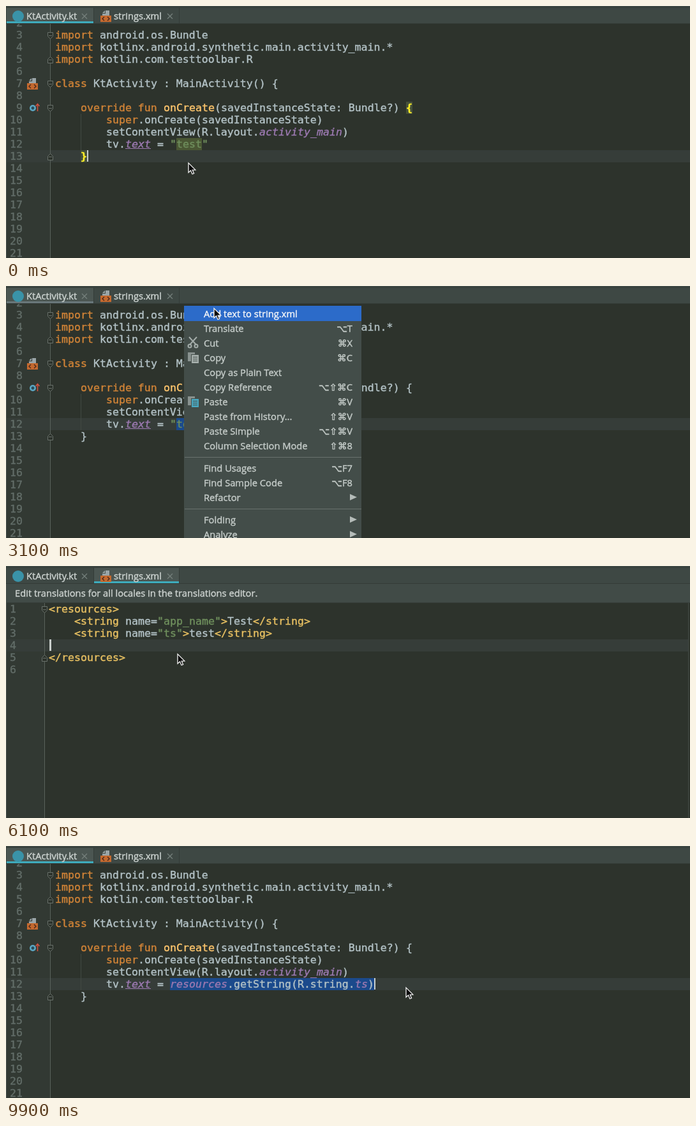
An HTML page with a canvas for the animation above (10000 ms loop, 1072x395 px).

```html
<!DOCTYPE html>
<html>
<head>
<meta charset="utf-8">
<style>
html, body { margin: 0; width: 100%; height: 100%; overflow: hidden; background: #2d332c; }
canvas { display: block; }
</style>
</head>
<body>
<canvas id="stage" width="1072" height="395"></canvas>
<script>
const ctx = document.getElementById('stage').getContext('2d');
const MONO = '16.6px "DejaVu Sans Mono", monospace';
const UI = '14.7px "Open Sans", "DejaVu Sans", sans-serif';
const CW = 10, LH = 19;
const INK = { t: '#b3c2c6', o: '#d08337', f: '#ffc66d', p: '#9b79b0', u: '#9b79b0', s: '#6f8f5d', x: '#e8c062', b: '#ffef28' };

const rect = (c, x, y, w, h) => { ctx.fillStyle = c; ctx.fillRect(x, y, w, h); };
const frame = (c, x, y, w, h, lw = 1) => {
  ctx.strokeStyle = c; ctx.lineWidth = lw;
  ctx.strokeRect(x + lw / 2, y + lw / 2, w - lw, h - lw);
};
const dot = (c, x, y, r) => { ctx.fillStyle = c; ctx.beginPath(); ctx.arc(x, y, r, 0, 7); ctx.fill(); };
function path(pts, fill, stroke, lw = 1, open) {
  ctx.beginPath();
  pts.forEach(([x, y]) => ctx.lineTo(x, y));
  if (!open) ctx.closePath();
  if (fill) { ctx.fillStyle = fill; ctx.fill(); }
  if (stroke) { ctx.strokeStyle = stroke; ctx.lineWidth = lw; ctx.stroke(); }
}
// a hairline outline gives the slightly heavy screen smoothing
function ink(font, c, s, x, y) {
  ctx.font = font; ctx.fillStyle = ctx.strokeStyle = c; ctx.lineWidth = .4;
  ctx.fillText(s, x, y);
  ctx.strokeText(s, x, y);
}
function label(s, x, y, c = '#c6cdca', align = 'left') {
  ctx.textAlign = align;
  ink(UI, c, s, x, y);
  ctx.textAlign = 'left';
}
// parts alternate between an ink key and text
function code(parts, x, y) {
  for (let i = 0; i < parts.length; i += 2) {
    const k = parts[i], s = parts[i + 1], w = s.length * CW;
    const style = k === 'p' || k === 'u' ? 'italic ' : k === 'b' ? 'bold ' : '';
    ink(style + MONO, INK[k], s, x, y);
    if (k === 'u') rect(INK.u, x, y + 1, w, 1);
    x += w;
  }
}
const lineNo = (n, x, y) => ink(MONO, '#626d68', n, x, y);
function fold(x, y, dir) {
  const p = [[-4, -5], [4, -5], [4, 1], [0, 5], [-4, 1]];
  path(p.map(([a, b]) => [x + a + .5, y + b * dir + .5]), '#2d332c', '#69716b');
  rect('#69716b', x - 2, y, 5, 1);
}

function xmlIcon(x, y) {
  path([[x + 8, y], [x + 14, y], [x + 14, y + 8], [x + 3, y + 8], [x + 3, y + 5], [x + 8, y + 5]], '#9aa5a8');
  path([[x + 3, y + 4], [x + 7, y], [x + 7, y + 4]], '#9aa5a8');
  rect('#c4692f', x, y + 8, 17, 10);
  path([[x + 6, y + 10], [x + 3, y + 13], [x + 6, y + 16]], null, '#46261a', 1.3, true);
  path([[x + 11, y + 10], [x + 14, y + 13], [x + 11, y + 16]], null, '#46261a', 1.3, true);
}
function cross(x, y) {
  path([[x - 4, y - 4], [x + 4, y + 4]], null, '#75807c', 1.2, true);
  path([[x + 4, y - 4], [x - 4, y + 4]], null, '#75807c', 1.2, true);
}
function tabs(xml, focused) {
  rect('#3e4844', 0, 0, 1072, 28);
  rect('#333b37', 0, 2, 1072, 1);
  rect('#343b37', 0, 27, 1072, 1);
  const x = xml ? 138 : 1, w = xml ? 133 : 136;
  rect('#4b5652', x, 3, w, 24);
  rect('#343c38', 137, 3, 1, 24);
  rect('#343c38', 271, 3, 1, 24);
  rect(focused ? '#3eabbc' : '#69777a', x, 24, w, 3);
  dot('#3a93a8', 19, 16, 9);
  label('KtActivity.kt', 32, 21, '#ced5d2'); cross(123, 16);
  xmlIcon(148, 7);
  label('strings.xml', 169, 21, '#ced5d2'); cross(257, 16);
}

const ktLines = {
  3: ['o', 'import ', 't', 'android.os.Bundle'],
  4: ['o', 'import ', 't', 'kotlinx.android.synthetic.main.activity_main.*'],
  5: ['o', 'import ', 't', 'kotlin.com.testtoolbar.R'],
  7: ['o', 'class ', 't', 'KtActivity : MainActivity() {'],
  9: ['o', '    override fun ', 'f', 'onCreate', 't', '(savedInstanceState: Bundle?) '],
  10: ['o', '        super', 't', '.onCreate(savedInstanceState)'],
  11: ['t', '        setContentView(R.layout.', 'p', 'activity_main', 't', ')']
};
const setText = ['t', '        tv.', 'u', 'text', 't', ' = '];
const col = c => 77 + c * CW;
const rowTop = n => 36 + (n - 3) * LH;
const caret = (x, y, w = 2) => rect('#c9cfcc', x, y, w, 18);

function ktView(t, m, blink) {
  const start = t < 700, replaced = t >= 4900, sel = !start && !replaced;
  rect('#2d332c', 0, 28, 1072, 367);
  rect('#323933', 0, 28, 69, 367);
  rect('#363d39', 0, rowTop(start ? 13 : 12), 1072, LH);
  rect('#59615b', 69, 28, 1, 367);
  ctx.save();
  ctx.beginPath(); ctx.rect(0, 28, 1072, 367); ctx.clip();
  for (let n = 2; n < 22; n++) lineNo(n, n < 10 ? 16 : 6, rowTop(n) + 15);
  ctx.restore();
  for (const n of [3, 7, 9]) fold(69, rowTop(n) + 10, 1);
  for (const n of [5, 13]) fold(69, rowTop(n) + 10, -1);
  rect('#414842', 117, rowTop(10), 1, 3 * LH);

  xmlIcon(33, 113);
  dot('#5ba6c2', 42, 160, 5); dot('#2c4b58', 42, 160, 2.4);
  path([[49.5, 165], [49.5, 154]], null, '#d0503f', 1.6, true);
  path([[46.5, 157], [49.5, 153.5], [52.5, 157]], null, '#d0503f', 1.5, true);

  if (start) {
    rect('#4a5734', 267, rowTop(12), 40, LH);
    rect('#45503b', 627, rowTop(9), 10, LH);
    rect('#45503b', 117, rowTop(13), 10, LH);
  }
  if (sel) rect('#1b4a8c', 267, rowTop(12), 40, LH);
  const dragEnd = Math.max(18, Math.min(50, Math.round((m[0] - 77) / CW)));
  if (t >= 8900) rect('#1b4a8c', col(18), rowTop(12), (dragEnd - 18) * CW, LH);

  for (const n in ktLines) code(ktLines[n], 77, rowTop(+n) + 15);
  const brace = start ? 'b' : 't';
  code([brace, '{'], 627, rowTop(9) + 15);
  code([brace, '}'], 117, rowTop(13) + 15);
  const value = !replaced ? ['s', '"test"']
    : t < 7800 ? ['t', 'resources.getString(R.string.ts)']
    : ['p', 'resources', 't', '.getString(R.string.', 'p', 'ts', 't', ')'];
  code([...setText, ...value], 77, rowTop(12) + 15);

  if (t >= 1500 && t < 2400) {
    dot('#f0b850', 92.5, 211, 6.5);
    rect('#e4a84a', 89, 214, 7, 4);
    rect('#a9b0ac', 89, 218, 7, 4);
  }
  if (!blink || (t >= 2400 && t < 4900)) return;
  if (start) caret(127, rowTop(13));
  else if (sel) caret(307, rowTop(12));
  else caret(col(t < 8800 ? 20 : dragEnd), rowTop(12));
}

const xmlLines = [
  ['x', '<resources>'],
  ['x', '    <string ', 't', 'name=', 's', '"app_name"', 'x', '>', 't', 'Test', 'x', '</string>'],
  ['x', '    <string ', 't', 'name=', 's', '"ts"', 'x', '>', 't', 'test', 'x', '</string>'],
  [],
  ['x', '</resources>'],
  []
];
function xmlView(blink) {
  rect('#2d332c', 0, 28, 1072, 367);
  rect('#323933', 0, 57, 60, 338);
  rect('#414b47', 0, 28, 1072, 29);
  rect('#363e3a', 0, 57, 1072, 1);
  label('Edit translations for all locales in the translations editor.', 14, 48, '#ced4d1');
  rect('#363d39', 0, 115, 1069, LH);
  rect('#59615b', 60, 58, 1, 337);
  rect('#434b46', 1069, 58, 1, 337);
  xmlLines.forEach((l, i) => {
    lineNo(i + 1, 6, 73 + i * LH);
    code(l, 67, 73 + i * LH);
  });
  fold(60, 68, 1); fold(60, 144, -1);
  if (blink) caret(68, 115, 3);
}

// label, row centre, shortcut ('>' marks a submenu)
const menuItems = [
  ['Add text to string.xml', 43], ['Translate', 66, '⌥T'], ['Cut', 89, '⌘X'], ['Copy', 112, '⌘C'],
  ['Copy as Plain Text', 135], ['Copy Reference', 158, '⌥⇧⌘C'], ['Paste', 181, '⌘V'],
  ['Paste from History...', 204, '⇧⌘V'], ['Paste Simple', 227, '⌥⇧⌘V'], ['Column Selection Mode', 250, '⇧⌘8'],
  ['Find Usages', 285, '⌥F7'], ['Find Sample Code', 308, '⌥F8'], ['Refactor', 331, '>'],
  ['Folding', 366, '>'], ['Analyze', 389, '>']
];
function menu(m) {
  rect('#434d49', 279, 31, 278, 380);
  for (const [s, y, key] of menuItems) {
    const hot = Math.abs(m[1] - y) < 11.5;
    if (hot) rect('#2c6bc9', 279, y - 12, 278, 24);
    const c = hot ? '#f4f6f8' : '#c6cdca';
    label(s, 310, y + 6, c);
    if (key === '>') path([[539, y - 5], [550, y], [539, y + 5]], '#b5bcb9');
    else if (key) label(key, 543, y + 6, c, 'right');
  }
  rect('#69726e', 280, 268, 277, 1);
  rect('#69726e', 280, 349, 277, 1);
  const g = '#a4adaa';
  path([[287, 80], [298, 92]], null, g, 2, true);
  path([[299, 80], [288, 92]], null, g, 2, true);
  for (const x of [288, 298]) { ctx.beginPath(); ctx.arc(x, 94, 2.5, 0, 7); ctx.stroke(); }
  for (const [y, c] of [[104, g], [173, '#49a5bd']]) {
    rect('#89928f', 285, y, 11, 14);
    rect('#434d49', 290, y + 3, 13, 15);
    rect(c, 291, y + 4, 11, 13);
    for (const d of [7, 10, 13]) rect('#48524e', 293, y + d, 7, 1);
  }
}

function dialog(t, blink) {
  ctx.save();
  ctx.shadowColor = 'rgba(0,0,0,.55)'; ctx.shadowBlur = 26; ctx.shadowOffsetY = 9;
  ctx.fillStyle = '#3d4642';
  ctx.beginPath(); ctx.roundRect(470, 181, 450, 193, [5, 5, 0, 0]); ctx.fill();
  ctx.restore();
  const g = ctx.createLinearGradient(0, 181, 0, 204);
  g.addColorStop(0, '#e3e5e2'); g.addColorStop(1, '#cbd0cc');
  ctx.fillStyle = g;
  ctx.beginPath(); ctx.roundRect(470, 181, 450, 23, [5, 5, 0, 0]); ctx.fill();
  dot('#f0584e', 484, 193, 6.5); dot('#c4c8c5', 504, 193, 6.5); dot('#29c341', 524, 193, 6.5);

  label('string value', 480, 238);
  rect('#434e49', 576, 218, 330, 29); frame('#626c67', 576, 218, 330, 29);
  label('test', 583, 238);
  label('string name', 480, 280);
  rect('#434e49', 574, 258, 335, 33); frame('#30659b', 573, 257, 336, 35, 3);
  const name = t < 4400 ? '' : t < 4600 ? 't' : 'ts';
  label(name, 583, 280);
  if (blink) rect('#c9cfcc', 583 + ctx.measureText(name).width, 266, 1, 17);

  rect('#46514c', 743, 304, 18, 18); frame('#75807b', 743, 304, 18, 18);
  path([[747, 313], [751, 317], [758, 307]], null, '#d2d8d5', 2, true);
  label('replace selected text', 769, 319);
  rect('#34668f', 706, 337, 91, 31); frame('#4c7ba1', 706, 337, 91, 31);
  label('OK', 751, 358, '#d6dfe5', 'center');
  rect('#4b5551', 814, 337, 92, 31); frame('#616b66', 814, 337, 92, 31);
  label('Cancel', 860, 358, '#c6cdca', 'center');
}

// time, x, y of the pointer tip
const moves = [
  [0, 286, 246], [200, 286, 246], [600, 281, 214], [2500, 281, 214], [3000, 326, 35], [4600, 326, 35],
  [4700, 690, 310], [4800, 748, 350], [4900, 748, 350], [5300, 205, 16], [5500, 205, 16], [6000, 269, 138],
  [6700, 269, 138], [7200, 84, 17], [7700, 84, 17], [8300, 700, 229], [8800, 258, 215],
  [9500, 627, 222], [10000, 627, 222]
];
function pointer(t) {
  const i = moves.findIndex(k => k[0] > t);
  const [t0, x0, y0] = moves[i - 1], [t1, x1, y1] = moves[i];
  const u = (t - t0) / (t1 - t0), e = u * u * (3 - 2 * u);
  return [x0 + (x1 - x0) * e, y0 + (y1 - y0) * e];
}
function arrow([x, y]) {
  const p = [[0, 0], [0, 15], [3.5, 11.8], [6, 17.5], [8.6, 16.4], [6.2, 11], [10.8, 10.8]];
  path(p.map(([a, b]) => [x + a, y + b]), '#080808', '#f2f2f2', 1.3);
}

function draw(now) {
  const t = Math.floor(now % 10000 / 100) * 100;
  const m = pointer(t);
  const blink = (t + 200) % 1000 < 500 || (t >= 7300 && t < 7800) || t >= 8900;
  const xml = t >= 5400 && t < 7300;
  const menuOn = t >= 2400 && t < 3300, dialogOn = t >= 3300 && t < 4900;
  if (xml) xmlView(blink); else ktView(t, m, blink);
  tabs(xml, !menuOn && !dialogOn);
  rect('#4b534f', 0, 28, 1, 367);
  if (menuOn) menu(m);
  if (dialogOn) dialog(t, blink);
  if (t < 3500 || t >= 4700) arrow(m);
  requestAnimationFrame(draw);
}
requestAnimationFrame(draw);
</script>
</body>
</html>
```
